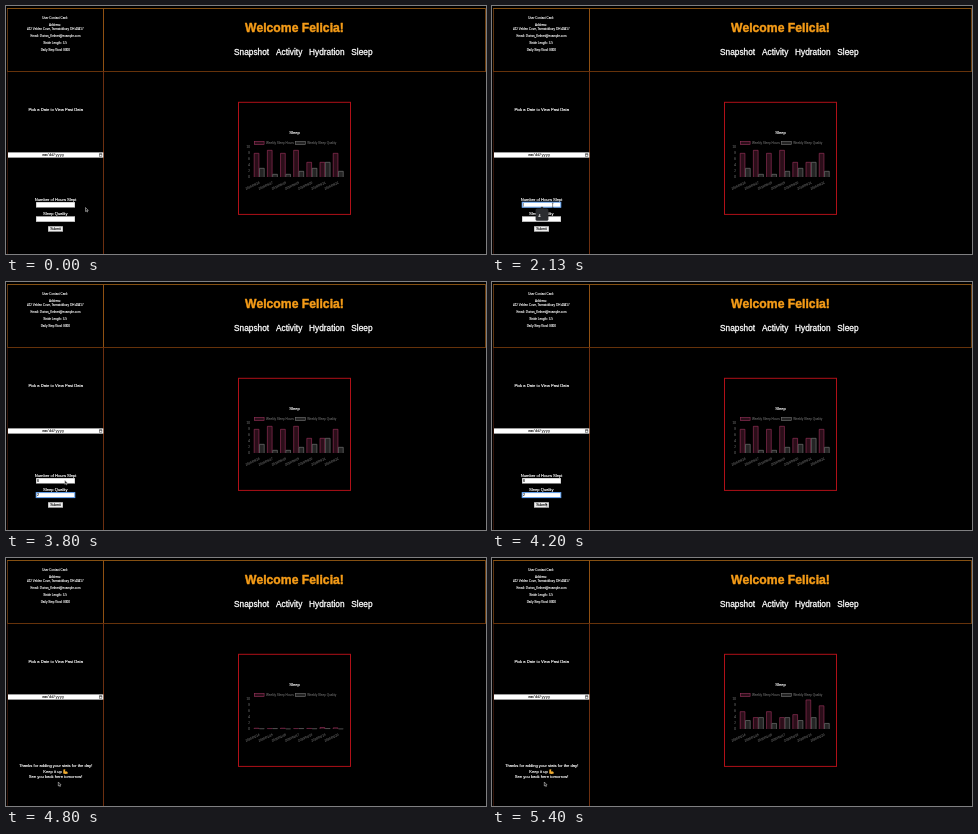
Write an HTML page with a canvas that moves like this. It is 480 px wide and 248 px high and loops after 5.47 s.

```html
<!DOCTYPE html>
<html lang="en">
<head>
<meta charset="utf-8">
<title>Sleep dashboard</title>
<style>
html, body { margin: 0; width: 100%; height: 100%; overflow: hidden; background: #000; }
canvas { display: block; width: 480px; height: 248px; }
</style>
</head>
<body>
<canvas id="stage" width="480" height="248"></canvas>
<script>
const ctx = document.getElementById('stage').getContext('2d');
const LOOP = 5470, STEPS = 82;
const SANS = '"Liberation Sans", Arial, sans-serif';
const MONO = '"Liberation Mono", monospace';
const BODY = 4.1, SMALL = 3.0, CHART = 3.07;
const PINK = ['#2b0e19', '#96325a'], GRAY = ['#242424', '#747474'], LABEL = '#5c5c5c';

// Moments of the interaction, in ms
const FOCUS_HOURS = 1120, TIP_ON = 1260, TYPE_HOURS = 2590;
const FOCUS_QUALITY = 2920, TYPE_QUALITY = 3260;
const PRESS = 4390, RELEASE = 4520, THANKS = 4660, CHART_START = 4788;

const before = { hours: [8, 9, 8, 9, 5, 5, 8], quality: [3, 1, 1, 2, 3, 5, 2], date: i => '2019/09/' + (16 + i) };
const after = { hours: [6, 4, 6, 4, 5, 10, 8], quality: [3, 4, 2, 4, 3, 4, 2], date: i => '2020/01/' + (14 + i) };

const pointerPath = [
  [0, 79.5, 201.5], [60, 79.5, 201.5], [270, 63.5, 198.8], [590, 63.5, 198.8],
  [600, 60.8, 198.8], [3740, 60.8, 198.8], [3800, 58.8, 198.3],
  [4330, 52.3, 224], [LOOP, 52.3, 224]
];

function rect(x, y, w, h, color) {
  ctx.fillStyle = color;
  ctx.fillRect(x, y, w, h);
}

function frame(x, y, w, h, color, width = 1) {
  ctx.strokeStyle = color;
  ctx.lineWidth = width;
  ctx.strokeRect(x, y, w, h);
}

// Glyphs are laid out large and scaled down to keep fractional advances;
// a hairline outline gives them a slightly heavier weight.
function text(str, x, y, size, color = '#fff', { align = 'center', weight = '', font = SANS, angle = 0 } = {}) {
  ctx.save();
  ctx.translate(x, y);
  ctx.rotate(angle);
  ctx.scale(0.1, 0.1);
  ctx.font = `${weight} ${size * 10}px ${font}`;
  ctx.textAlign = align;
  ctx.fillStyle = ctx.strokeStyle = color;
  ctx.lineWidth = size * 0.35;
  ctx.lineJoin = 'round';
  ctx.fillText(str, 0, 0);
  ctx.strokeText(str, 0, 0);
  ctx.restore();
}

function polygon(points, fill, stroke, width) {
  ctx.beginPath();
  points.forEach(([x, y]) => ctx.lineTo(x, y));
  ctx.closePath();
  ctx.fillStyle = fill;
  ctx.fill();
  if (stroke) {
    ctx.strokeStyle = stroke;
    ctx.lineWidth = width;
    ctx.stroke();
  }
}

function drawPanels() {
  rect(0, 0, 480, 248, '#000');
  rect(1, 65, 1, 183, '#30140a');
  rect(1, 2, 1, 63, '#5c3410');
  rect(1, 2, 479, 1, '#855012');
  rect(1, 65, 479, 1, '#66320a');
  rect(479, 2, 1, 64, '#6e4010');
  rect(97, 2, 1, 63, '#8f5012');
  rect(97, 65, 1, 183, '#6c2f10');

  text('User Contact Card:', 49, 13, SMALL);
  text('Address:', 49, 20.2, SMALL);
  text('412 Velden Cove, Tarnwickbury OH 40417', 49.3, 23.8, SMALL);
  text('Email: Dorian_Kelmet@example.com', 49.5, 31.2, SMALL);
  text('Stride Length: 3.5', 49, 38.2, SMALL);
  text('Daily Step Goal: 8000', 49.3, 45.2, SMALL);

  text('Welcome Felicia!', 288.5, 26.3, 12.2, '#f59c18', { weight: 'bold' });
  [['Snapshot', 228], ['Activity', 270], ['Hydration', 303], ['Sleep', 345.3]]
    .forEach(([label, x]) => text(label, x, 49, 8.3, '#fff', { align: 'left' }));
}

function drawDatePicker(t) {
  const y = t < THANKS ? 146.4 : 136.4;
  text('Pick a Date to View Past Data', 49.7, 105.3, BODY);
  rect(2, y, 95.3, 5.2, '#fff');
  text('mm/dd/yyyy', 47.3, y + 3.8, 3.6, '#222', { font: MONO });
  frame(93.7, y + 1.5, 2.2, 2.3, '#333', 0.5);
  rect(93.5, y + 1.3, 2.6, 0.8, '#333');
}

function drawField(y, value, focused, caret) {
  rect(30, y, 39, 5.4, '#fff');
  frame(30.2, y + 0.2, 38.6, 5, focused ? '#5b9bea' : '#999', focused ? 1 : 0.4);
  text(value, 31, y + 3.9, 3.4, '#111', { align: 'left' });
  if (caret) rect(value ? 33.2 : 31.2, y + 1, 0.4, 3.4, '#111');
}

function blink(t, since) {
  return Math.floor((t - since) / 500) % 2 === 0;
}

function drawForm(t) {
  const onHours = t >= FOCUS_HOURS && t < FOCUS_QUALITY;
  const onQuality = t >= FOCUS_QUALITY && t < PRESS;
  const typedQuality = t >= TYPE_QUALITY;

  text('Number of Hours Slept', 49.6, 195, BODY);
  drawField(196, t >= TYPE_HOURS ? '8' : '', onHours, onHours && blink(t, FOCUS_HOURS));
  text('Sleep Quality', 49.3, 209.4, BODY);
  drawField(210.4, typedQuality ? '2' : '', onQuality,
    onQuality && blink(t, typedQuality ? TYPE_QUALITY : FOCUS_QUALITY));

  const pressed = t >= PRESS && t < RELEASE;
  rect(42, 220.2, 15, 5.4, pressed ? '#cfcfcf' : '#efefef');
  frame(42.2, 220.4, 14.6, 5, t >= PRESS ? '#333' : '#888', 0.4);
  text('Submit', 49.5, 224.1, 3.4, '#111');

  if (t >= TIP_ON && t < TYPE_HOURS) {
    ctx.beginPath();
    ctx.roundRect(43.6, 202.4, 12.8, 12.4, 1.6);
    ctx.fillStyle = '#2b2d30';
    ctx.fill();
    polygon([[48, 202.5], [50, 200.6], [52, 202.5]], '#2b2d30');
    text('4', 47.5, 210.5, 3.6, '#eee');
  }
}

function drawThanks() {
  text('Thanks for adding your stats for the day!', 49.6, 209.4, BODY);
  text('Keep it up', 37.3, 215, BODY, '#fff', { align: 'left' });
  text('See you back here tomorrow!', 49.6, 220.4, BODY);

  // Flexed arm
  ctx.beginPath();
  ctx.moveTo(57.4, 211.5);
  ctx.lineTo(59.3, 211.3);
  ctx.lineTo(59, 213.4);
  ctx.quadraticCurveTo(61.3, 212.5, 62, 215.2);
  ctx.quadraticCurveTo(60.2, 216.4, 57.2, 215.6);
  ctx.closePath();
  ctx.fillStyle = '#f0ac30';
  ctx.fill();
}

function drawBar(x, height, [fill, stroke]) {
  const base = 171, w = 5.3;
  rect(x, base - height, w, height, fill);
  ctx.beginPath();
  ctx.moveTo(x + 0.3, base);
  ctx.lineTo(x + 0.3, base - height + 0.3);
  ctx.lineTo(x + w - 0.3, base - height + 0.3);
  ctx.lineTo(x + w - 0.3, base);
  ctx.strokeStyle = stroke;
  ctx.lineWidth = 0.6;
  ctx.stroke();
}

function drawLegend(x, label, [fill, stroke]) {
  rect(x, 135.4, 10, 3.2, fill);
  frame(x + 0.3, 135.6, 9.8, 3, stroke, 0.6);
  text(label, x + 12, 138.2, CHART, LABEL, { align: 'left' });
}

function drawChart(t) {
  const renewed = t >= CHART_START;
  const data = renewed ? after : before;
  const p = renewed ? Math.min(1, (t - CHART_START) / 1000) : 1;
  const unit = 3 * (1 - (1 - p) ** 4);

  frame(232.5, 96.3, 112, 112.1, '#b01018');
  text('Sleep', 288.5, 128.2, BODY);
  drawLegend(248, 'Weekly Sleep Hours', PINK);
  drawLegend(289.2, 'Weekly Sleep Quality', GRAY);
  for (let v = 0; v <= 10; v += 2) {
    text(String(v), 244, 172 - v * 3, CHART, LABEL, { align: 'right' });
  }
  for (let i = 0; i < 7; i++) {
    const x = 247.9 + i * 13.17;
    drawBar(x, data.hours[i] * unit, PINK);
    drawBar(x + 5.3, data.quality[i] * unit, GRAY);
    text(data.date(i), x + 6, 177.4, CHART, LABEL, { align: 'right', angle: -0.43 });
  }
}

function pointerAt(t) {
  const i = pointerPath.findIndex(([time]) => time > t);
  const [t0, x0, y0] = pointerPath[i - 1], [t1, x1, y1] = pointerPath[i];
  const p = (t - t0) / (t1 - t0), ease = p * p * (3 - 2 * p);
  return [x0 + (x1 - x0) * ease, y0 + (y1 - y0) * ease];
}

function drawPointer(t) {
  const [x, y] = pointerAt(t);
  if (t >= 260 && t < 3790) {
    rect(x - 0.25, y - 1.8, 0.5, 4.4, '#222');
    rect(x - 0.9, y - 2, 1.8, 0.4, '#222');
    rect(x - 0.9, y + 2.4, 1.8, 0.4, '#222');
    return;
  }
  const shape = [[0, 0], [0, 4], [0.9, 3.2], [1.5, 4.6], [2.1, 4.3], [1.6, 3], [2.8, 2.9]];
  polygon(shape.map(([dx, dy]) => [x + dx, y + dy]), '#111', '#ddd', 0.5);
}

function draw() {
  // Steps begin on whole hundredths of a second, just ahead of the even division.
  const step = Math.floor((performance.now() % LOOP) / LOOP * STEPS + 0.1);
  const t = (step % STEPS) * LOOP / STEPS;
  drawPanels();
  drawDatePicker(t);
  drawChart(t);
  if (t < THANKS) drawForm(t);
  else drawThanks();
  drawPointer(t);
  requestAnimationFrame(draw);
}
draw();
</script>
</body>
</html>
```
